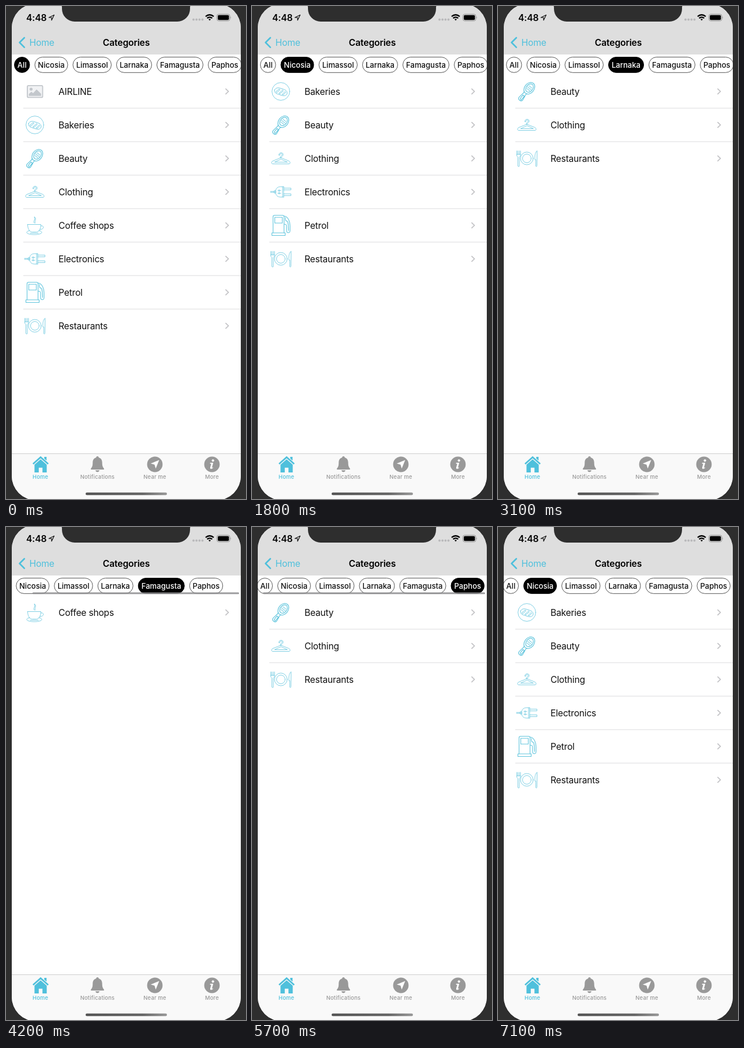
Animation of 416 by 854 pixels, one loop 7.3 s. Source, as an HTML page:

```html
<!DOCTYPE html>
<html lang="en">
<head>
<meta charset="utf-8">
<title>Categories</title>
<style>
  html, body { margin: 0; width: 100%; height: 100%; overflow: hidden; background: #2e2e2e; }
  svg { display: block; width: 100%; height: 100%; }
  text { font-family: Inter, Roboto, "Liberation Sans", sans-serif; }
  .big { font-size: 15.7px; letter-spacing: -.15px; }
  .bold { font-weight: 600; }
  .row { font-size: 15.6px; letter-spacing: -.2px; fill: #111; }
  .chip { font-size: 13.1px; font-weight: 500; text-anchor: middle; }
  .tab { font-size: 9.4px; font-weight: 500; letter-spacing: .2px; text-anchor: middle; }
  .line { fill: none; stroke: #62c5dd; stroke-width: .8; stroke-linecap: round; stroke-linejoin: round; }
</style>
</head>
<body>
<svg viewBox="0 0 416 854">
  <defs>
    <clipPath id="screen"><rect x="10" y="-4" width="397" height="860" rx="42"/></clipPath>
    <linearGradient id="grip"><stop stop-color="#555"/><stop offset=".7" stop-color="#666"/><stop offset="1" stop-color="#999"/></linearGradient>

    <g id="AIRLINE">
      <rect x="-13" y="-10.2" width="26.5" height="20.6" rx="2" fill="#f1f2f4" stroke="#c3c7cc" stroke-width="1.8"/>
      <circle cx="-6.5" cy="-4" r="2.6" fill="#c3c7cc"/>
      <path d="M-10.5 7.8V4.5l4.5-4 3 2.6 6-6.6 7.8 7.5v3.8z" fill="#c3c7cc"/>
    </g>
    <g id="Bakeries" class="line">
      <circle r="15.4"/>
      <g transform="rotate(18)">
        <path d="M-11 1c0-4 4-6 8-6h7c4 0 7.500 2 7.500 5.500S8 6 4 6h-8c-4 0-7-1.500-7-5z"/>
        <path d="M-8 3l4-6c2 0 2 1 1 2l-3 5zM-2 4l4-7c2 0 2 1 1 2l-3 5zM4 4l3-6c2 0 2 1 1 2l-2 4z"/>
      </g>
    </g>
    <g id="Beauty" class="line" transform="rotate(38)" style="stroke-width:1.2">
      <ellipse cy="-7" rx="8.300" ry="11"/>
      <ellipse cy="-7.500" rx="5.800" ry="8"/>
      <path d="M-3.500 3c1 2 1 3 0 6l-1 7c0 5 8 5 8 0l-1-7c-1-3-1-4 0-6M-1.500 9v7c0 2 3 2 3 0V9z"/>
      <path d="M-3-10h6M-4-7h8M-3-4h6" stroke-dasharray="1 1.500"/>
    </g>
    <g id="Clothing" class="line">
      <path d="M-3.500-6c0-5 7.500-5 7.500-.5 0 3-3.500 2.500-3.500 5.500h-1.500c0-4 3.200-3.500 3.200-5.500 0-2.500-4-2.500-4 .5zM-.3-1L-14 4.500c-3 1.500-2.500 5 0 5h28c2.500 0 3-3.500 0-5z"/>
      <path d="M0 1.500L-11 6.500h22z"/>
    </g>
    <g id="Coffee" class="line">
      <path d="M-1-4c-3-4 3-5 0-11 5 4 0 6 1.500 11M-12.500-1.500h23c0 7-3 13-8 13h-7c-5 0-8-6-8-13zM10.500 1c6-2 6 7-2 6"/>
      <path d="M-9 9c-9 2-6 7 8 7s17-5 8-7M-8 13.500h14"/>
    </g>
    <g id="Electronics" class="line">
      <path d="M-18-.8h7M-18 .8h7M-11-2h2v4h-2zM-9-2.500C-8-7-5-9 0-9h3V9H0c-5 0-8-2-9-6.500zM5-9v18M3-9h2M3 9h2M5-6.500h12.500v3H5M5 3.500h12.500v3H5"/>
      <path d="M-5-2.500h5M-5 2.500h5M-3-4v8"/>
    </g>
    <g id="Petrol" class="line" style="stroke-width:1.100">
      <path d="M-13.500 13v-28c0-1.500 1-2.500 2.500-2.500H3c1.500 0 2.500 1 2.500 2.500v28M-15.500 13H7.500v4.500h-23zM-10.500-14H2.500v10h-13z"/>
      <path d="M5.500-16c5 0 6 3 8 6 2 4 2.500 7 2.500 11v8c0 5-6 5-6 0V2c0-3-1-4-4.500-4M8-14v5l4 3c1 4 1.500 6 1.500 15"/>
    </g>
    <g id="Restaurants" class="line">
      <circle r="11"/><circle r="7.500"/>
      <path d="M-17.500-13v7c0 2 1 3 2 3.500V13c0 1.500 2.500 1.500 2.500 0V-2.500c1-.5 2-1.500 2-3.500v-7M-15.500-13v6M-13-13v6M-17.500-7h6.500M17.500-13c-3 2-4 8-3.500 15h1.500v11c0 1.500 2 1.500 2 0z"/>
    </g>
  </defs>

  <rect width="416" height="854" fill="#2e2e2e"/>
  <g clip-path="url(#screen)">
    <rect y="-4" width="416" height="860" fill="#fff"/>
    <g id="lists"></g>
    <g id="chips"></g>
    <rect id="bar" y="113.300" height="3" rx="1.500" fill="#8e8e90" opacity="0"/>

    <rect y="-4" width="416" height="88" fill="#dedede"/>
    <path d="M91-4q6 0 6 7v2a22 22 0 0 0 22 22h178a22 22 0 0 0 22-22V3q0-7 6-7z" fill="#2e2e2e"/>
    <text class="big bold" x="35" y="25.500">4:48</text>
    <path d="M83.500 15.500L74.300 20h4.700v4.700z" fill="none" stroke="#111" stroke-width="1.200" stroke-linejoin="round"/>
    <g fill="#b9b9bb"><circle cx="325" cy="23.500" r="1.900"/><circle cx="330.200" cy="23.500" r="1.900"/><circle cx="335.400" cy="23.500" r="1.900"/><circle cx="340.500" cy="23.500" r="1.900"/></g>
    <g fill="none" stroke="#000" stroke-width="2.300">
      <path d="M346 18.200q7-6 14 0M348.600 21.200q4.400-3.600 8.800 0"/>
      <path d="M351 22.900q2-1.500 4 0L353 25.200z" fill="#000" stroke="none"/>
    </g>
    <rect x="365.500" y="14.200" width="22.500" height="11.600" rx="3.300" fill="none" stroke="#929292"/>
    <rect x="367.100" y="15.800" width="19.300" height="8.400" rx="1.900"/>
    <path d="M389.200 18q1.600 2 0 4z" fill="#929292"/>
    <path d="M31.800 55l-8.300 8.300 8.300 8.300" fill="none" stroke="#4fc0dc" stroke-width="2.700" stroke-linecap="round" stroke-linejoin="round"/>
    <text class="big" x="40.500" y="69" fill="#4fc0dc">Home</text>
    <text class="big bold" x="208.500" y="69" text-anchor="middle">Categories</text>

    <rect y="775" width="416" height="81" fill="#f9f9f9"/>
    <rect y="775" width="416" height="1" fill="#cfcfcf"/>
    <g fill="#4fc0dc">
      <path d="M60 779.800l14 12.400-1.800 2L60 783.600l-12.200 10.600-1.800-2z"/>
      <path d="M66.300 781h4v6.500l-4-3.600zM60 785.200l10.600 9.300V808h-7.400v-8.200h-6.400v8.200h-7.400v-13.500z"/>
      <text class="tab" x="59.700" y="818.500">Home</text>
    </g>
    <g fill="#999">
      <path d="M158.500 780c1.600 0 2.300 1 2.300 2.300 4 1 5.900 4.300 5.900 8.500 0 6 1 8 3 10.200.8 1 .3 2-.8 2h-20.800c-1.100 0-1.600-1-.8-2 2-2.200 3-4.200 3-10.200 0-4.200 1.900-7.500 5.900-8.500 0-1.300.7-2.300 2.300-2.300zM155 804.300h7c-.5 4-6.500 4-7 0z"/>
      <text class="tab" x="158.500" y="818.500">Notifications</text>
      <circle cx="258" cy="794" r="13.400"/>
      <path d="M265.500 786.500l-6 14.700-2-6.700-6.700-2z" fill="#fff"/>
      <text class="tab" x="258" y="818.500">Near me</text>
      <circle cx="357" cy="794" r="13.400"/>
      <circle cx="358.700" cy="787.300" r="2.100" fill="#fff"/>
      <path d="M353.800 791.300h5.400l-2.300 8.600 2-.8-.3 1.300c-2.300 1.800-5.300 1.900-4.600-1l1.700-6.300-2.100-.4z" fill="#fff"/>
      <text class="tab" x="357" y="818.500">More</text>
    </g>
    <rect x="138" y="842.700" width="141" height="4.500" rx="2.200" fill="url(#grip)"/>
  </g>
</svg>
<script>
const LOOP = 7300, STEP = 100, FADE = 350, PITCH = 58, TOP = 148;
const rows = ['AIRLINE', 'Bakeries', 'Beauty', 'Clothing', 'Coffee shops', 'Electronics', 'Petrol', 'Restaurants'];
// name, left edge, width, indices of the rows it lists
const tabs = [
  ['All', 14, 27.5, [0, 1, 2, 3, 4, 5, 6, 7]],
  ['Nicosia', 49.5, 58, [1, 2, 3, 5, 6, 7]],
  ['Limassol', 115.5, 67.5, [1, 2, 3, 6, 7]],
  ['Larnaka', 191, 62, [2, 3, 7]],
  ['Famagusta', 261, 81, [4]],
  ['Paphos', 350, 58.5, [2, 3, 7]]
];
// start time, chosen tab
const picks = [[-FADE, 0], [1321, 1], [2169, 2], [2720, 3], [3540, 4], [5160, 5], [6150, 1]];
const scrollKeys = [[0, 0], [3850, 0], [4200, 32.3], [4350, 35], [4600, 35], [5000, 5.5]];
const barKeys = [[0, 0], [3850, 0], [3950, .85], [5750, .85], [6050, 0]];

const byId = id => document.getElementById(id);
function add(parent, markup) {
  parent.insertAdjacentHTML('beforeend', markup);
  return parent.lastElementChild;
}

const lists = tabs.map(([, , , items]) => {
  const group = add(byId('lists'), '<g></g>');
  items.forEach((item, i) => {
    const name = rows[item];
    const rule = i < items.length - 1 ? '<rect x="30" y="28.5" width="377" height="1" fill="#dcdcde"/>' : '';
    add(group, `<g>
      <g transform="translate(50)"><use href="#${name.split(' ')[0]}"/></g>
      <text class="row" x="91" y="5.8">${name}</text>
      <path d="M380.500-4.800l5 4.800-5 4.800" fill="none" stroke="#c2c2c5" stroke-width="1.700"/>${rule}</g>`);
  });
  return group;
});

const chips = tabs.map(([name, x, w]) => {
  const group = add(byId('chips'), '<g></g>');
  const face = (fill, ink, edge) => add(group, `<g>
    <rect x="${x + .5}" y="88.5" width="${w - 1}" height="26.8" rx="13.400" fill="${fill}" stroke="${edge}"/>
    <text class="chip" x="${x + w / 2}" y="106.700" fill="${ink}">${name}</text></g>`);
  return { group, off: face('#fff', '#111', '#555'), on: face('#000', '#fff', '#000') };
});

function easeInOut(x) {
  if (x <= 0 || x >= 1) return x <= 0 ? 0 : 1;
  let lo = 0, hi = 1, u = .5;
  for (let i = 0; i < 20; i++) {
    u = (lo + hi) / 2;
    const at = 3 * u * (1 - u) * (.42 * (1 - u) + .58 * u) + u ** 3;
    if (at < x) lo = u; else hi = u;
  }
  return u * u * (3 - 2 * u);
}

function track(keys, t) {
  const i = keys.findIndex(k => k[0] > t);
  if (i < 0) return keys[keys.length - 1][1];
  const [t0, a] = keys[i - 1], [t1, b] = keys[i];
  return a + (b - a) * easeInOut((t - t0) / (t1 - t0));
}

const span = tab => (tabs[tab][3].length - 1) * PITCH;

function draw(t) {
  let n = picks.length - 1;
  while (picks[n][0] > t) n--;
  const [start, now] = picks[n];
  const before = n ? picks[n - 1][1] : now;
  const p = easeInOut((t - start) / FADE);
  const weight = tab => tab === now ? (n ? p : 1) : tab === before ? 1 - p : 0;
  const height = span(before) + (span(now) - span(before)) * p;

  lists.forEach((list, tab) => {
    const w = weight(tab), items = list.children;
    list.setAttribute('opacity', w);
    list.setAttribute('display', w ? 'inline' : 'none');
    const pitch = items.length > 1 ? height / (items.length - 1) : 0;
    if (w) [...items].forEach((row, i) => row.setAttribute('transform', `translate(0 ${TOP + i * pitch})`));
  });

  chips.forEach(({ group, on, off }, tab) => {
    const w = weight(tab);
    on.setAttribute('opacity', w);
    off.setAttribute('opacity', 1 - w);
    group.append(tab === now ? off : on); // the fading face stays on top
  });

  const shift = track(scrollKeys, t), left = 13.5 + shift;
  byId('chips').setAttribute('transform', `translate(${-shift})`);
  byId('bar').setAttribute('x', left);
  byId('bar').setAttribute('width', 398.5 + Math.min(shift, 5.5) - left);
  byId('bar').setAttribute('opacity', track(barKeys, t));
}

const begin = performance.now();
function tick() {
  const t = (performance.now() - begin) % LOOP;
  draw(Math.floor(t / STEP) * STEP);
  requestAnimationFrame(tick);
}
tick();
</script>
</body>
</html>
```
